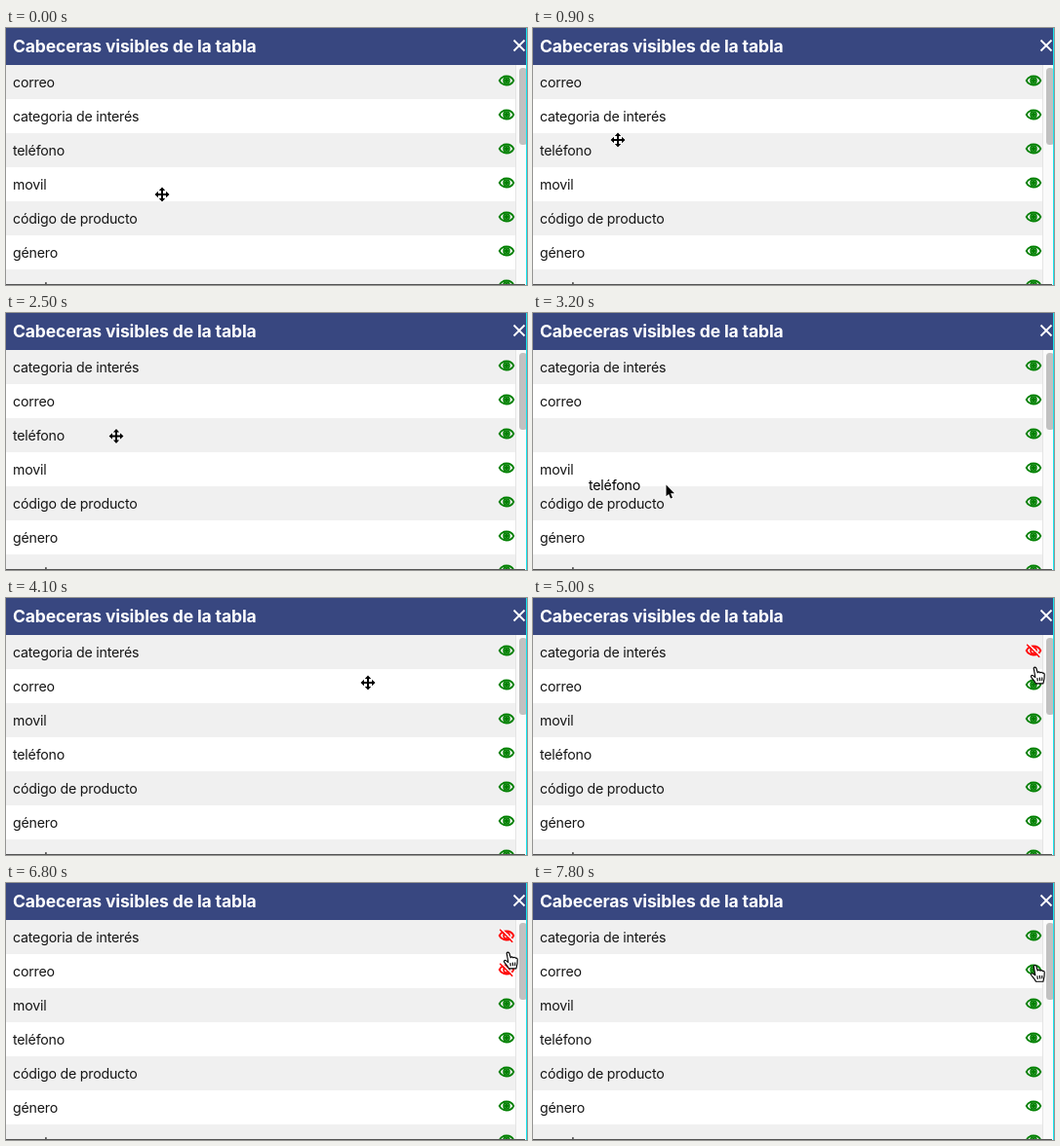
Recreate the animation shown at these times as an HTML page. Size 534 by 264 pixels, loop 8000 ms.

```html
<!DOCTYPE html>
<html lang="es">
<head>
<meta charset="utf-8">
<style>
  html, body { margin: 0; width: 100%; height: 100%; overflow: hidden; background: #fff; }
  svg { display: block; }
  text { font: 14.2px Inter, "Liberation Sans", sans-serif; letter-spacing: -.21px; fill: #151515; }
  .title { font-weight: 700; font-size: 17.5px; letter-spacing: -.13px; fill: #fff; }
</style>
</head>
<body>
<svg id="stage" width="534" height="264" viewBox="0 0 534 264">
  <defs>
    <g id="eye" fill="none" stroke="green">
      <path d="M-7.3 0C-4.5-6 4.5-6 7.3 0 4.5 6-4.5 6-7.3 0z" stroke-width="1.8"/>
      <circle r="3" stroke-width="1.5"/><circle r="2.2" fill="green" stroke="none"/>
    </g>
    <g id="eyeOff" fill="none" stroke="red">
      <path d="M-7.3 0C-4.5-6 4.5-6 7.3 0 4.5 6-4.5 6-7.3 0z" stroke-width="1.8"/>
      <circle r="3" stroke-width="1.5"/>
      <path d="M-5.6-7.2L7.4 5.8" stroke="#fff" stroke-width="1.4"/>
      <path d="M-6.8-6.2L6.2 6.8" stroke-width="1.5"/>
    </g>
  </defs>
  <g id="rows"></g>
  <path d="M522 38h11v226h-11z" fill="#fafafa"/>
  <path d="M522.5 38v226" stroke="#e4e4e4"/>
  <rect x="526" y="41" width="8" height="79" rx="3.5" fill="#c1c1c1"/>
  <path d="M0 0h534v38H0z" fill="#384780"/>
  <text class="title" x="7" y="24.5">Cabeceras visibles de la tabla</text>
  <path d="M520.5 12.5l11 11m0-11l-11 11" stroke="#fff" stroke-width="1.8"/>
  <path d="M533.5 0v264" stroke="#16e6ee"/>
  <g id="labels"></g>
  <path d="M0 263.5h532" stroke="#555"/>
  <g id="cursor">
    <path id="move" stroke="#fff" stroke-width="1.6" paint-order="stroke" d="M0-7.5L3.2-4H1v3h3v-2.2L7.5 0 4 3.2V1H1v3h2.2L0 7.5-3.2 4H-1V1h-3v2.2L-7.5 0-4-3.2V-1h3v-3h-2.2z"/>
    <path id="arrow" stroke="#fff" stroke-width="1.8" paint-order="stroke" d="M-2.5-7.5V4.3L.2 1.9 2 6.6 4 5.8 2.1 1.3H6z"/>
    <path id="hand" transform="scale(.95)" fill="#fff" stroke="#000" stroke-width="1.2" stroke-linejoin="round" d="M-4-8c.7-1.4 2.4-1.2 2.8.2l1.4 4.6c.6-1.2 2.4-1 2.7.2.8-1 2.4-.6 2.7.5 1-.6 1.9.1 2 1.2.2 3.4-.2 6-1.4 10H-1.6c-1.2-2.6-2.9-4.2-4.9-6.6-1.2-1.6.5-3.1 2-1.9L-2.3 1.9zM-.2 2.5l.6 3.6M2.4 2l.4 3.8M5 2v3.6"/>
  </g>
</svg>
<script>
const $ = id => document.getElementById(id);
const LOOP = 8000, ROW = 35, TOP = 38;
const names = ['correo', 'categoria de interés', 'teléfono', 'movil', 'código de producto', 'género', 'puesto'];

// Pointer moves: start, end, x, y; it rests in between
const moves = [
  [0, 700, 76, 118], [800, 900, 87, 115], [900, 1400, 69, 61], [1500, 1900, 137, 120],
  [2400, 2600, 89, 133], [2800, 3200, 139, 184], [3600, 4100, 371, 87], [4100, 4500, 486, 66]
];
// Then it goes back and forth between the first two eyes
[4800, 5200, 5800, 6700, 6900, 7600].forEach((end, i) =>
  moves.push([end - 300, end, 517, 73 + 20 * (i % 2)]));

names.forEach((name, i) => {
  const y = TOP + i * ROW;
  $('rows').innerHTML += `<rect y="${y}" width="534" height="${ROW}" fill="${i % 2 ? '#fff' : '#f0f0f0'}"/>
    <use href="#eye" x="513" y="${y + 16}"/>`;
  $('labels').innerHTML += `<text x="7" y="${y + 23}">${name}</text>`;
});
const labels = $('labels').children, eyes = $('rows').querySelectorAll('use');

const progress = (t, start, end) => Math.min(1, Math.max(0, (t - start) / (end - start)));
const ease = (t, start, span) => 1 - (1 - progress(t, start, start + span)) ** 2;
const place = (el, x, y) => el.setAttribute('transform', `translate(${x} ${y})`);

function pointer(t) {
  return moves.reduce(([x, y], [start, end, toX, toY]) => {
    const p = progress(t, start, end);
    return [x + (toX - x) * p, y + (toY - y) * p];
  }, [160, 171]);
}

// Follows the pointer from grab to drop, then settles one row lower
function drag(el, t, grab, drop) {
  const [gx, gy] = pointer(grab), [x, y] = pointer(Math.min(Math.max(t, grab), drop));
  const k = ease(t, drop, 220);
  place(el, (x - gx) * (1 - k), (y - gy) * (1 - k) + ROW * k);
  el.style.fill = t >= grab && k < 1 ? '#000' : '';
}

function draw(t) {
  const [correo, categoria, telefono, movil] = labels;
  drag(correo, t, 1500, 2100);
  place(categoria, 0, -ROW * ease(t, 1862, 250));
  drag(telefono, t, 2800, 3600);
  place(movil, 0, -ROW * ease(t, 3230, 250));

  const setEye = (i, off) => eyes[i].setAttribute('href', off ? '#eyeOff' : '#eye');
  setEye(0, t >= 5000 && t < 7200);
  setEye(1, t >= 5500 && t < 7800);

  const kind = t >= 4700 ? 'hand' : t >= 2900 && t < 3900 ? 'arrow' : 'move';
  for (const id of ['move', 'arrow', 'hand']) $(id).style.display = id === kind ? '' : 'none';
  place($('cursor'), ...pointer(t));
}

const begin = performance.now();
function tick() {
  // The picture advances ten times a second
  draw(Math.floor((performance.now() - begin) % LOOP / 100) * 100);
  requestAnimationFrame(tick);
}
tick();
</script>
</body>
</html>
```
